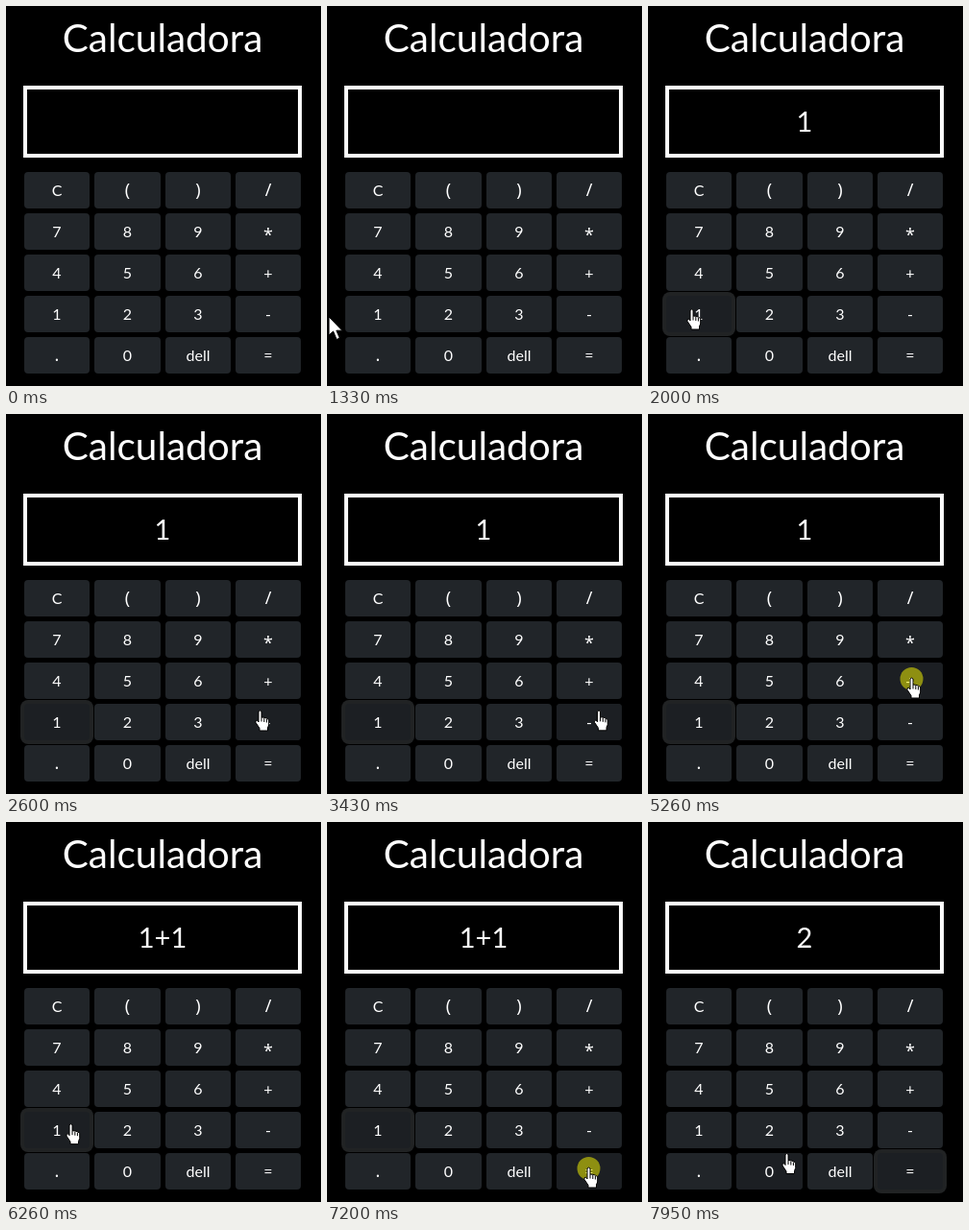
Write an HTML page that moves like this. It is 328 px wide and 396 px high and loops after 8000 ms.

```html
<!DOCTYPE html>
<html lang="pt">
<head>
<meta charset="utf-8">
<title>Calculadora</title>
<style>
  html, body { margin: 0; width: 100%; height: 100%; overflow: hidden; background: #000; }
  svg { display: block; width: 328px; height: 396px; }
  text { fill: #fff; font-family: Lato, "Noto Sans", sans-serif; text-anchor: middle; }
  .title { font-size: 40.5px; }
  .display { font-size: 29px; }
  .key text { font-size: 16px; }
  .key .symbol { font: 18px "Noto Sans", sans-serif; }
  .ring { fill: #212324; }
  .face { fill: #212529; }
  .shade { fill: #1c1f23; }
  .pointer path { fill: #fff; stroke: #000; stroke-linejoin: round; }
</style>
</head>
<body>
<svg viewBox="0 0 328 396">
  <rect width="328" height="396"/>
  <text class="title" x="163" y="48">Calculadora</text>
  <rect x="20" y="85" width="286" height="71" fill="none" stroke="#fff" stroke-width="4"/>
  <text class="display" id="display" x="163" y="131"></text>
  <g id="keys"></g>
  <g id="pointer" class="pointer">
    <circle id="click" cx="-.5" cy="1" r="12" fill="#ff0" fill-opacity=".5"/>
    <path id="arrow" d="M0 0V19L4.5 15 8 23.5 11.2 22 7.8 14.2H13.8Z"/>
    <g id="hand">
      <path d="M-2 1Q-.5-.8 1 1V7L4 7.3 6.5 8.2 8.7 9.6V15L7.5 18V21H-1V18.5L-5 12.5Q-5.5 10-3.5 10.2L-2 12Z"/>
      <path d="M1 7V11.5M3.8 8V12M6.4 9V12.5"/>
    </g>
  </g>
</svg>
<script>
// All times are counted in steps of 1/15 second.
const STEP = 1000 / 15, LOOP = 120, FADE = 2, CLICK = 2;
const KEY_H = 38;
const labels = [...'C()/789*456+123-.0', 'dell', '='];

const presses = [
  { key: 'C', at: 0, blur: 3 },
  { key: '1', at: 28 },
  { key: '+', at: 79 },
  { key: '1', at: 92 },
  { key: '=', at: 108 }
];
presses.forEach((p, i) => { p.blur ??= presses[i + 1]?.at ?? Infinity; });

const entry = { x: 2, y: 324, at: 20 };
const moves = [
  { from: 20, to: 25, x: 46, y: 316 },
  { from: 32, to: 39, x: 265, y: 309 },
  { from: 40, to: 45, x: 283, y: 324 },
  { from: 48, to: 61, x: 287, y: 212 },
  { from: 62, to: 72, x: 297, y: 348 },
  { from: 72, to: 78, x: 275, y: 275 },
  { from: 81, to: 89, x: 56, y: 312 },
  { from: 92, to: 106, x: 273, y: 360 },
  { from: 110, to: 119, x: 145, y: 345.5 }
];

const $ = id => document.getElementById(id);
const clamp = v => Math.max(0, Math.min(1, v));
const ease = v => v * v * (3 - 2 * v);
const show = (el, on) => { el.style.display = on ? '' : 'none'; };

function add(parent, tag, attrs) {
  const el = document.createElementNS('http://www.w3.org/2000/svg', tag);
  for (const name in attrs) el.setAttribute(name, attrs[name]);
  return parent.appendChild(el);
}

const keys = labels.map((label, i) => {
  const left = 19 + (i % 4) * 73.25;
  const x = Math.round(left), width = Math.round(left + 68.25) - x;
  const y = 173 + Math.floor(i / 4) * 43;
  const group = add($('keys'), 'g', { class: 'key' });
  const box = (cls, grow) => add(group, 'rect', {
    class: cls, x: x - grow, y: y - grow, rx: 4 + grow,
    width: width + 2 * grow, height: KEY_H + 2 * grow
  });
  const ring = box('ring', 4);
  box('face', 0);
  const shade = box('shade', 0);
  add(group, 'text', {
    class: /[()/*.]/.test(label) ? 'symbol' : '',
    x: x + width / 2, y: y + (label === '*' ? 29 : 25)
  }).textContent = label;
  const contains = p => p.x >= x && p.x <= x + width && p.y >= y && p.y <= y + KEY_H;
  return { label, ring, shade, contains };
});

function pointerAt(step) {
  return moves.reduce((p, m) => {
    const k = ease(clamp((step - m.from) / (m.to - m.from)));
    return { x: p.x + (m.x - p.x) * k, y: p.y + (m.y - p.y) * k };
  }, entry);
}

function focusOf(label, step) {
  const levels = presses.filter(p => p.key === label)
    .map(p => clamp((step - p.at) / FADE) - clamp((step - p.blur) / FADE));
  return Math.max(0, ...levels);
}

function type(text, key) {
  if (key === 'C') return '';
  if (key === '=') return String(text.split('+').reduce((sum, n) => sum + Number(n), 0));
  return text + key;
}

function draw(ms) {
  const step = Math.floor((ms + 8) / STEP) % LOOP;
  const pointer = pointerAt(step);
  const visible = step >= entry.at;
  let overKey = false;

  for (const key of keys) {
    const hover = visible && key.contains(pointer);
    const focus = focusOf(key.label, step);
    overKey ||= hover;
    key.ring.style.opacity = focus;
    key.shade.style.opacity = hover ? 1 : focus;
  }

  $('display').textContent = presses.filter(p => step >= p.at + CLICK)
    .reduce((text, p) => type(text, p.key), '');
  $('pointer').setAttribute('transform', `translate(${pointer.x} ${pointer.y})`);
  show($('pointer'), visible);
  show($('hand'), overKey);
  show($('arrow'), !overKey);
  show($('click'), presses.some(p => step >= p.at && step < p.at + CLICK));
}

const start = performance.now();
function tick() {
  draw(performance.now() - start);
  requestAnimationFrame(tick);
}
tick();
</script>
</body>
</html>
```
